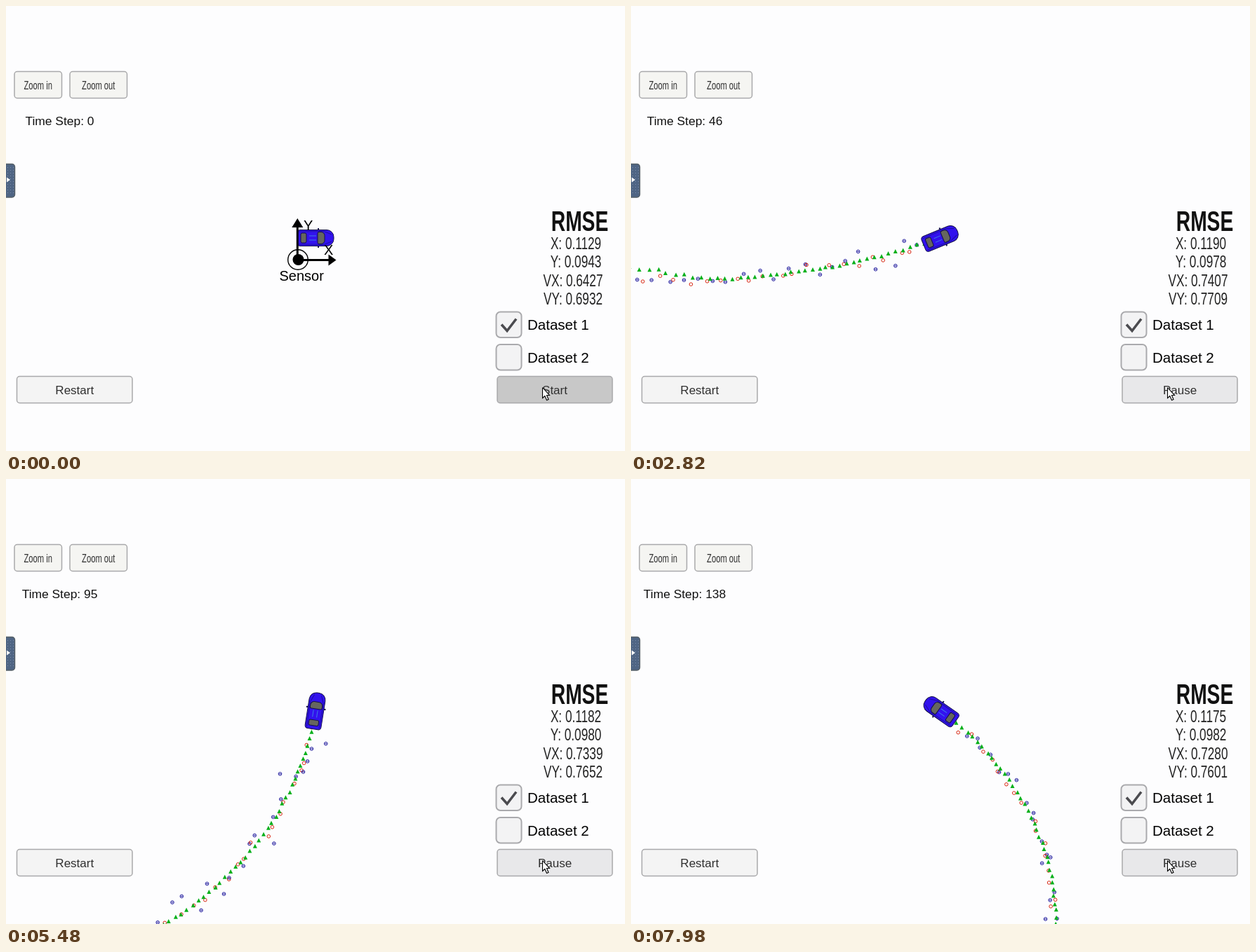
Write an HTML page with a canvas that moves like this. It is 882 by 635 pixels and loops after 8 s.

```html
<!DOCTYPE html>
<html lang="en">
<head>
<meta charset="utf-8">
<title>Sensor fusion tracking</title>
<style>
  html, body { margin: 0; width: 100%; height: 100%; overflow: hidden; background: #fdfdfe; }
  canvas { display: block; }
</style>
</head>
<body>
<canvas id="stage" width="882" height="635"></canvas>
<script>
const ctx = document.getElementById('stage').getContext('2d');
const LOOP = 8000;
const LAST_STEP = 138;
const CAR = { x: 441, y: 331 };
const TAU = Math.PI * 2;
const FONT = '"Liberation Sans", Arial, sans-serif';

// Waypoints of the drive; positions are pixels relative to the sensor, headings degrees.
const route = [
  { tick: 0, step: 0, x: 25, y: -31, heading: 0 },
  { tick: 17, step: 12, x: 155, y: -32, heading: 0 },
  { tick: 41, step: 30, x: 348, y: -49, heading: 8 },
  { tick: 81, step: 62, x: 659, y: -172, heading: 37 },
  { tick: 104, step: 83, x: 798, y: -334, heading: 65 },
  { tick: 133, step: 107, x: 839, y: -569, heading: 97 },
  { tick: 171, step: 138, x: 678, y: -824, heading: 145 }
];
const errors = [
  { name: 'X', before: .1129, from: .1195, to: .1175 },
  { name: 'Y', before: .0943, from: .0976, to: .0982 },
  { name: 'VX', before: .6427, from: .7454, to: .7280 },
  { name: 'VY', before: .6932, from: .7749, to: .7601 }
];

const mix = (a, b, u) => a + (b - a) * u;
const radians = degrees => degrees * Math.PI / 180;

function segment(key, value) {
  const end = Math.max(1, route.findIndex(p => p[key] >= value));
  const a = route[end - 1], b = route[end];
  return { a, b, u: (value - a[key]) / (b[key] - a[key]) };
}

function stepAt(tick) {
  const { a, b, u } = segment('tick', tick);
  return Math.round(mix(a.step, b.step, u));
}

// Hermite curve through the waypoints, leaving each along its heading.
function poseAt(step) {
  const { a, b, u } = segment('step', step);
  const reach = Math.hypot(b.x - a.x, b.y - a.y);
  const curve = (p, q, m, n) => {
    const d = q - p;
    return p + u * (m + u * (3 * d - 2 * m - n + u * (m + n - 2 * d)));
  };
  const out = radians(a.heading), arrive = radians(b.heading);
  return {
    x: curve(a.x, b.x, reach * Math.cos(out), reach * Math.cos(arrive)),
    y: curve(a.y, b.y, -reach * Math.sin(out), -reach * Math.sin(arrive)),
    heading: mix(a.heading, b.heading, u)
  };
}

function noise(seed) {
  const v = Math.sin(seed * 127.1 + 11.7) * 43758.5453;
  return (v - Math.floor(v)) * 2 - 1;
}

// Lidar and radar take turns. Radar errs sideways, more so with distance.
const estimates = [], measurements = [];
for (let i = 0; i < LAST_STEP; i++) {
  const { x, y } = poseAt(i);
  const settling = -16 * Math.cos(i / 6.5) * Math.exp(-i / 25);
  const bulge = -16 * Math.exp(-(((i - 6) / 5) ** 2));
  const wobble = 1.4 + 5 * Math.exp(-i / 5);
  estimates.push([x + settling + wobble * noise(i), y + bulge + wobble * noise(i + 300)]);

  const isLidar = i % 2 === 0;
  const sway = isLidar ? 0 : .022 * (noise(i + 40) + noise(i + 80));
  const spread = isLidar ? 7 : 5;
  const lag = -12 * Math.exp(-i / 4);
  measurements.push({
    isLidar,
    x: x - y * sway + lag + spread * noise(i + 600),
    y: y + x * sway + spread * noise(i + 900)
  });
}

function text(str, x, y, size, { color = '#000', align = 'left', squash = 1, weight = '' } = {}) {
  ctx.save();
  ctx.translate(x, y);
  ctx.scale(squash, 1);
  ctx.font = `${weight} ${size}px ${FONT}`;
  ctx.textAlign = align;
  ctx.fillStyle = color;
  ctx.fillText(str, 0, 0);
  ctx.restore();
}

function box(x, y, w, h, radius, fill, stroke = '#a9a9ab', width = 1.5) {
  ctx.beginPath();
  ctx.roundRect(x, y, w, h, radius);
  ctx.fillStyle = fill;
  ctx.fill();
  ctx.strokeStyle = stroke;
  ctx.lineWidth = width;
  ctx.stroke();
}

function polygon(points, fill) {
  ctx.beginPath();
  points.forEach(([x, y]) => ctx.lineTo(x, y));
  ctx.closePath();
  ctx.fillStyle = fill;
  ctx.fill();
}

function line(points, color, width) {
  ctx.beginPath();
  points.forEach(([x, y]) => ctx.lineTo(x, y));
  ctx.strokeStyle = color;
  ctx.lineWidth = width;
  ctx.stroke();
}

function ring(x, y, r, color, width) {
  ctx.beginPath();
  ctx.arc(x, y, r, 0, TAU);
  ctx.strokeStyle = color;
  ctx.lineWidth = width;
  ctx.stroke();
}

function drawTrail(step) {
  for (const { isLidar, x, y } of measurements.slice(0, step)) {
    ring(x, y, 2.3, isLidar ? '#d8240f' : '#1c169c', 1);
    if (!isLidar) line([[x - 1.5, y], [x + 1.5, y]], '#1c169c', 1);
  }
  for (const [x, y] of estimates.slice(0, step))
    polygon([[x, y - 3.2], [x + 3, y + 2.8], [x - 3, y + 2.8]], '#06b01a');
}

function drawSensor() {
  ring(0, 0, 14.3, '#000', 1.4);
  ctx.beginPath();
  ctx.arc(0.5, 0, 8, 0, TAU);
  ctx.fillStyle = '#000';
  ctx.fill();
  line([[-0.7, 0], [-0.7, -48]], '#000', 3);
  polygon([[-0.7, -59], [7.3, -46], [-8.7, -46]], '#000');
  line([[0, 0.6], [45, 0.6]], '#000', 3);
  polygon([[54.5, 0.6], [43.5, 8.6], [43.5, -7.4]], '#000');
  text('Y', 8, -42, 20);
  text('X', 37, -7, 20);
  text('Sensor', -26.5, 30, 20);
}

function drawCar(heading) {
  const outline = '#14104a', seam = '#1c0ca0', glass = '#66665f';
  ctx.save();
  ctx.translate(CAR.x, CAR.y);
  ctx.rotate(-radians(heading));
  line([[4, -14], [5, 0], [4, 14]], outline, 2);
  box(-26, -11.5, 52, 23, [4, 10, 10, 4], '#3212ee', outline, 1);
  for (const side of [-1, 1]) {
    line([[-24, 9 * side], [12, 9.5 * side], [23, 5 * side]], seam, 1);
    line([[-9, 3 * side], [1, 3 * side]], '#3f79e6', 1);
  }
  box(-21, -7, 8, 14, 2, glass, outline, 1);
  box(3, -8.5, 10, 17, [2, 5, 5, 2], glass, outline, 1);
  ctx.restore();
}

function button(label, x, y, w, h, fill, size = 17, squash = 1) {
  box(x, y, w, h, 4, fill);
  text(label, x + w / 2, y + h / 2 + 6, size, { color: '#303030', align: 'center', squash });
}

function checkbox(label, y, checked) {
  box(698.5, y, 36, 36.5, 6, '#f3f3f4', '#aaaaad', 2);
  if (checked) line([[706, y + 18], [714, y + 27], [727, y + 10]], '#4b4b4f', 3.6);
  text(label, 743, y + 25.5, 20.5);
}

function drawTab() {
  box(-6, 225.5, 18.5, 47.5, 4, '#4f6584', '#566068');
  ctx.fillStyle = '#7d8dab';
  for (let y = 230; y < 270; y += 4)
    for (let x = 2; x < 11; x += 4) ctx.fillRect(x, y, 1, 1);
  polygon([[1, 244.5], [6, 248], [1, 251.5]], '#fff');
}

function drawErrors(step) {
  text('RMSE', 817.5, 321, 40, { color: '#111', align: 'center', squash: .705, weight: 'bold' });
  errors.forEach(({ name, before, from, to }, row) => {
    const value = step ? mix(from, to, (step - 12) / (LAST_STEP - 12)) : before;
    text(`${name}: ${value.toFixed(4)}`, name.length > 1 ? 808 : 812, 346.5 + 26.6 * row, 24,
      { color: '#222', align: 'center', squash: .715 });
  });
}

function drawPanel(step) {
  button('Zoom in', 12, 93.5, 67.5, 38, '#f5f5f2', 16, .7);
  button('Zoom out', 91, 93.5, 81.5, 38, '#f5f5f2', 16, .7);
  text(`Time Step: ${step}`, 76.5, 170, 17.4, { color: '#111', align: 'center' });
  drawTab();
  drawErrors(step);
  checkbox('Dataset 1', 436.5, true);
  checkbox('Dataset 2', 483, false);
  button('Restart', 15.5, 528.5, 164.5, 38, '#f4f4f4');
  button(step ? 'Pause' : 'Start', 700, 528.5, 164, 38, step ? '#e8e8ea' : '#c8c8c8');
}

function drawCursor() {
  ctx.save();
  ctx.translate(764.5, 544.5);
  const arrow = [[0, 0], [0, 15], [3.3, 12], [6, 18], [8.5, 17], [6, 11], [10, 11], [0, 0]];
  polygon(arrow, '#fff');
  line(arrow, '#000', 1.1);
  ctx.restore();
}

// The picture advances in triplets: two short holds of 20 ms, then one of 100 ms.
function tickAt(time) {
  const shifted = time + 20;
  return 3 * Math.floor(shifted / 140) + Math.min(2, Math.floor(shifted % 140 / 20)) - 1;
}

function draw(time) {
  const step = stepAt(tickAt(time));
  const { x, y, heading } = poseAt(step);
  const inWorld = paint => {
    ctx.save();
    ctx.translate(CAR.x - x, CAR.y - y);
    paint();
    ctx.restore();
  };
  ctx.fillStyle = '#fdfdfe';
  ctx.fillRect(0, 0, 882, 635);
  inWorld(() => drawTrail(step));
  drawCar(heading);
  inWorld(drawSensor);
  drawPanel(step);
  drawCursor();
}

const start = performance.now();
function frame() {
  draw((performance.now() - start) % LOOP);
  requestAnimationFrame(frame);
}
frame();
</script>
</body>
</html>
```
